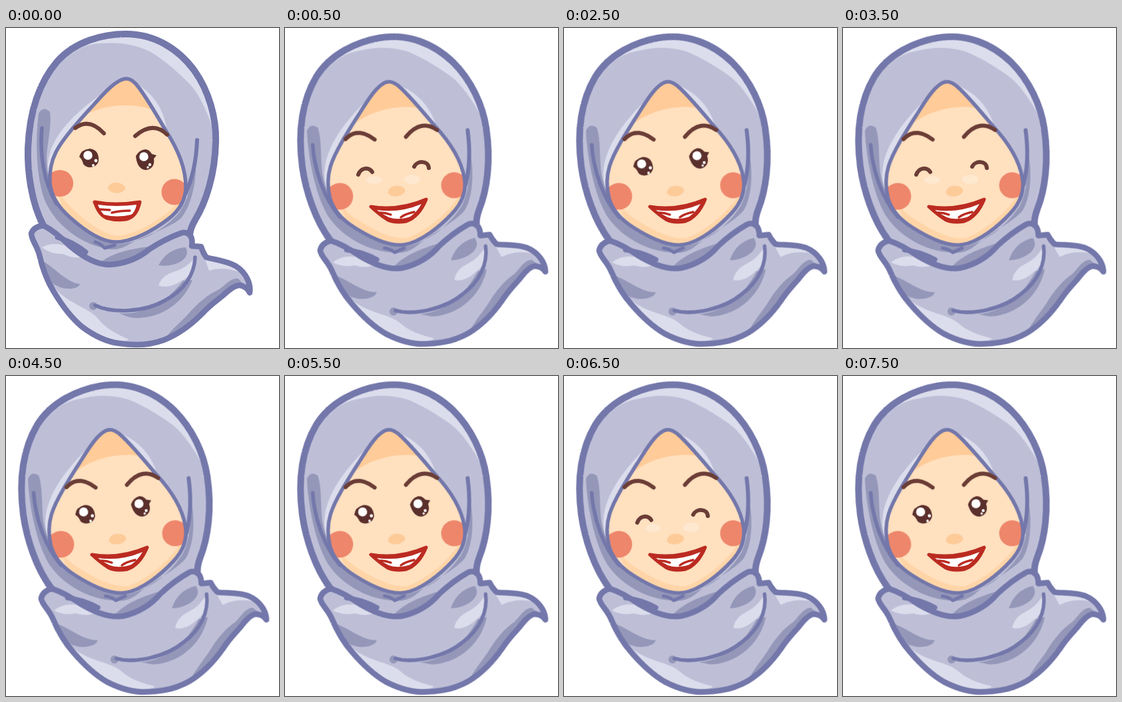
An HTML page without scripts that plays this animation: 410x480 px, repeating every 8000 ms.

```html
<!DOCTYPE html>
<html lang="en">
<head>
<meta charset="utf-8">
<title>Smiling girl</title>
<style>
html, body { margin: 0; width: 100%; height: 100%; overflow: hidden; background: #fff; }
svg { display: block; width: 410px; height: 480px; }
path { stroke-linecap: round; stroke-linejoin: round; }
.line { fill: none; stroke: #7377aa; }
.base { fill: #bebfd7; }
.light { fill: #dcddec; }
.dark { fill: #9497b8; }
.brow { fill: none; stroke: #6b3d36; stroke-width: 6; }
.eye { fill: #5b302c; }
.lip { fill: #bb2b21; stroke: #bb2b21; stroke-width: 5; }
.cut { fill: none; stroke: #bb2b21; stroke-width: 3.4; }
.white { fill: #fff; }

.girl { transform-origin: 195px 235px; animation: tilt 1s step-end infinite; }
.calm { animation: show 1s step-end infinite; }
.grin { animation: hide 1s step-end infinite; }
.open { animation: open 8s step-end infinite; }
.shut { animation: shut 8s step-end infinite; }
@keyframes tilt { 0% { transform: none; } 50%, 100% { transform: rotate(-9.8deg); } }
@keyframes show { 0% { opacity: 1; } 50%, 100% { opacity: 0; } }
@keyframes hide { 0% { opacity: 0; } 50%, 100% { opacity: 1; } }
@keyframes open {
  0%, 12.5%, 50%, 87.5%, 100% { opacity: 1; }
  6.25%, 43.75%, 81.25% { opacity: 0; }
}
@keyframes shut {
  0%, 12.5%, 50%, 87.5%, 100% { opacity: 0; }
  6.25%, 43.75%, 81.25% { opacity: 1; }
}
</style>
</head>
<body>
<svg viewBox="0 0 410 480">
  <defs>
    <path id="hood" d="M56 296C38 262 32 215 33 180C35 130 47 85 77 50C104 20 145 9 180 9C222 9 258 30 283 64C305 95 316 135 315 170C314 220 300 262 284 288Q277 300 276 312L240 370L100 370Z"/>
    <path id="face" d="M181 76C166 76 146 99 130 117C110 139 86 165 75 186C67 202 65 218 66 233C68 252 80 270 96 284C115 301 142 321 165 321C190 321 222 303 243 287C259 275 270 258 270 238C270 210 257 180 240 154C227 132 214 109 200 90Q190 76 181 76Z"/>
    <path id="scarf" d="M56 296Q42 298 38 308C38 318 46 325 50 340C55 362 62 380 72 396C84 416 96 433 114 448C134 463 152 471 170 473C195 477 218 475 237 468C260 459 278 445 294 429C306 416 316 409 325 402Q346 382 355 387Q363 390 366 397C368 384 361 367 345 357C330 349 315 348 301 344Q296 338 293 328L279 327Q281 315 275 309Q268 305 262 308C245 314 232 321 215 332C200 345 178 354 155 355C135 355 115 343 96 327Q75 306 56 296Z"/>
    <clipPath id="inHood"><use href="#hood"/></clipPath>
    <clipPath id="inFace"><use href="#face"/></clipPath>
    <clipPath id="inScarf"><use href="#scarf"/></clipPath>
    <filter id="rough" x="-5%" y="-5%" width="110%" height="110%" color-interpolation-filters="sRGB">
      <feTurbulence type="fractalNoise" baseFrequency=".4" numOctaves="2" seed="4"/>
      <feDisplacementMap in="SourceGraphic" scale="1.6" xChannelSelector="R" yChannelSelector="G"/>
    </filter>
  </defs>

  <g class="girl">
    <use href="#hood" class="base"/>
    <g clip-path="url(#inHood)">
      <path class="light" d="M98 40C112 28 125 24 142 23C160 22 175 22 190 26C205 30 215 34 224 40C242 52 260 68 274 82C290 98 302 125 312 155L330 100L250 5H180C150 10 115 24 98 40Z"/>
      <path class="light" d="M156 90C125 112 85 140 68 181C63 196 61 207 64 222L80 190L132 120Z"/>
      <path class="light" d="M200 86C218 98 236 118 241 150L224 124Z"/>
      <path class="dark" d="M49 128Q56 116 66 126C69 145 62 171 61 194C62 228 70 254 90 277C116 302 146 322 168 324C205 322 238 302 260 277C275 256 281 226 285 196C287 232 277 270 262 286C242 302 210 310 184 325Q168 335 150 331C108 322 73 293 58 258C45 222 44 168 49 128Z"/>
      <path class="dark" d="M144 350Q165 334 213 328Q190 352 150 354Z"/>
    </g>
    <g class="line" filter="url(#rough)">
      <path stroke-width="5.5" d="M54 150C50 188 57 233 76 264"/>
      <path stroke-width="6" d="M287 168C286 197 281 223 270 248"/>
      <path stroke-width="5" d="M134 321Q143 324 148 330L163 326"/>
    </g>

    <use href="#face" fill="#ffe0bf"/>
    <g clip-path="url(#inFace)">
      <path fill="#ffcb98" d="M112 134Q145 115 181 116Q212 116 236 130L205 70H160Z"/>
      <path fill="#ffd5a8" d="M64 200Q71 246 101 272C124 293 148 311 171 312C208 304 243 282 272 248L262 293L165 328L90 288Z"/>
      <circle cx="81" cy="233" r="20" fill="#ee866b"/>
      <circle cx="253" cy="246" r="19.5" fill="#ee866b"/>
    </g>
    <use href="#face" class="line" stroke-width="5.5"/>
    <path fill="#fdcb98" d="M153 241C154 234 161 231 167 232C175 233 180 237 179 242C175 249 158 250 153 241Z"/>
    <path class="brow" d="M104 150Q125 134 147 158M194 162Q221 139 242 160"/>

    <g class="open">
      <path class="eye" d="M110 193Q113 182 126 181C137 182 140 191 139 200C136 210 122 212 116 204Q115 198 110 193Z"/>
      <path class="eye" d="M195 192Q200 183 209 182Q215 182 219 189L226 191L222 196C224 207 217 213 209 213C201 212 196 204 195 192Z"/>
      <g class="white">
        <circle cx="123" cy="191" r="6.8"/><circle cx="207" cy="193" r="6.8"/>
        <circle cx="135" cy="199" r="2.4"/><circle cx="131" cy="206" r="1.9"/>
        <circle cx="216" cy="205" r="2.2"/><circle cx="213" cy="209" r="1.7"/>
      </g>
    </g>

    <g class="calm">
      <path class="lip" d="M133 261Q164 267 201 261C198 275 191 285 180 287Q165 289 151 285C141 281 137 271 133 261Z"/>
      <path class="white" d="M138 265Q166 269 196 265Q194 276 188 280Q166 285 147 280Q141 274 138 265Z"/>
      <path class="cut" d="M140 272L156 273M159 277Q171 274 186 274"/>
    </g>

    <use href="#scarf" class="base"/>
    <g clip-path="url(#inScarf)">
      <path class="light" d="M54 329C72 319 94 324 119 343Q101 347 86 339Q66 339 54 329Z"/>
      <path class="dark" d="M56 350C75 361 90 381 111 384Q109 391 94 391Q80 391 67 381Z"/>
      <path class="light" d="M74 391C96 415 126 420 139 437Q151 453 184 467L160 480C110 465 80 430 74 391Z"/>
      <path class="dark" d="M229 356Q242 331 270 329Q276 341 263 350Q247 359 229 356Z"/>
      <path class="light" d="M229 386Q234 371 254 365Q271 360 282 346Q282 370 264 379Q244 392 229 386Z"/>
      <path class="dark" d="M170 428C206 430 239 414 266 379L280 378C266 415 226 440 186 434Z"/>
      <circle class="dark" cx="131" cy="417" r="6"/>
      <path class="light" d="M299 347Q330 345 350 366Q325 357 305 364Z"/>
      <path class="dark" d="M233 474C245 455 258 445 272 431C288 412 303 400 320 392C330 385 338 374 349 376L372 402L300 445Z"/>
    </g>
    <g class="line" filter="url(#rough)">
      <path stroke-width="5.5" d="M134 416C159 428 207 427 238 409C266 395 283 371 284 344"/>
      <use href="#scarf" stroke-width="8.5"/>
      <path stroke-width="10" d="M56 296C38 262 32 215 33 180C35 130 47 85 77 50C104 20 145 9 180 9C222 9 258 30 283 64C305 95 316 135 315 170C314 220 300 262 284 288Q277 300 276 310"/>
      <path stroke-width="7" d="M77 314Q100 320 120 336"/>
    </g>
  </g>

  <g class="grin">
    <path class="lip" d="M129 268Q170 275 212 257C205 274 196 285 182 290Q164 293 153 287Q142 280 129 268Z"/>
    <path class="white" d="M138 273Q172 278 205 264Q198 276 188 283Q170 289 156 284Q147 280 138 273Z"/>
    <path class="cut" d="M143 277Q151 277 159 280M174 284Q180 279 194 276"/>
    <g class="shut">
      <ellipse cx="134" cy="228" rx="12" ry="6" fill="#ffe8d0"/>
      <ellipse cx="191" cy="227" rx="12" ry="7" fill="#ffe8d0"/>
      <path class="brow" d="M110 220C114 209 126 208 131 216M194 208C198 199 215 198 216 210"/>
    </g>
  </g>
</svg>
</body>
</html>
```
